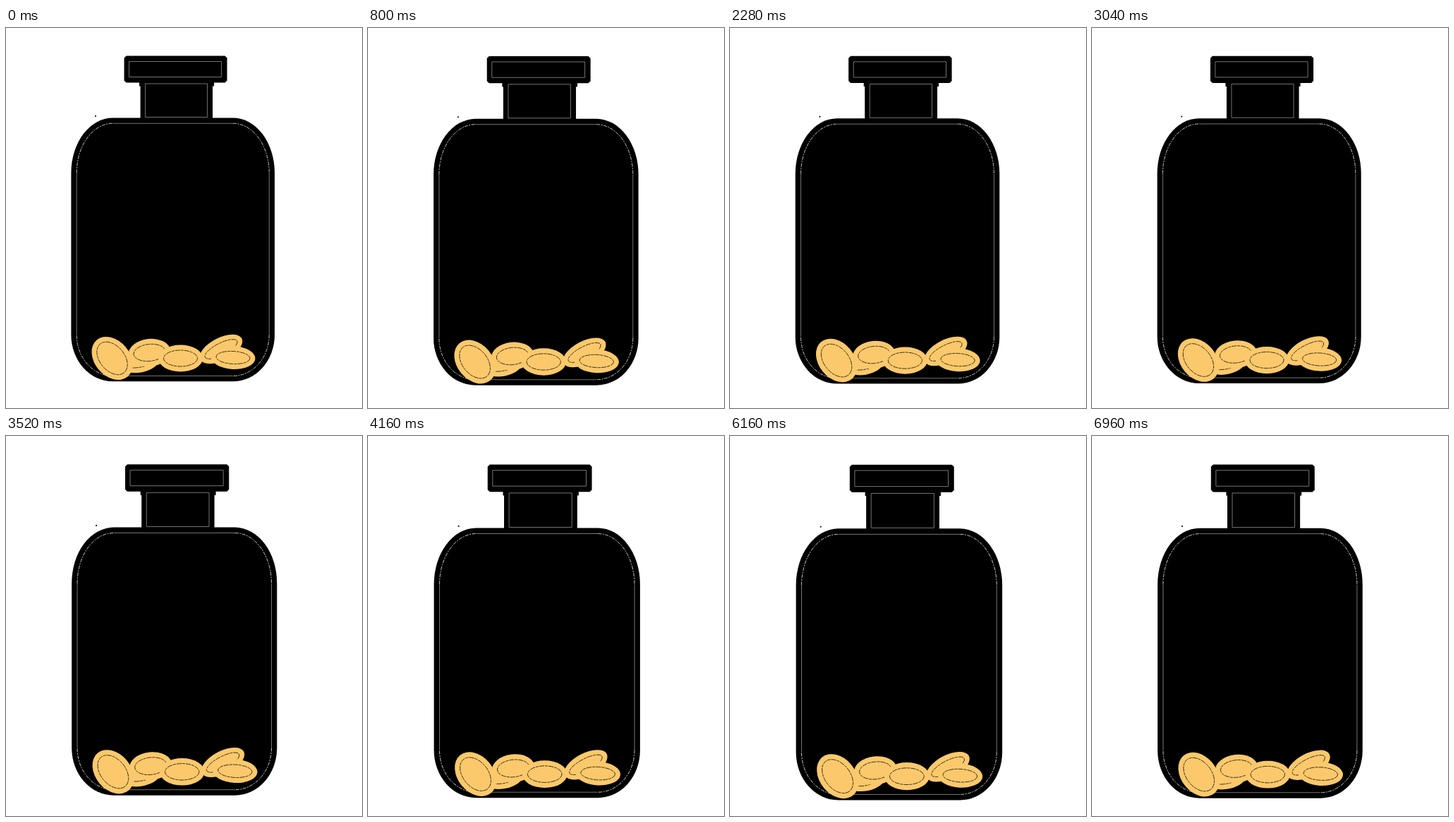
An HTML page with a canvas that plays this animation: 505x539 px, repeating every 7000 ms.

```html
<!DOCTYPE html>
<html lang="en">
<head>
<meta charset="utf-8">
<title>Jar of coins</title>
<style>
  html, body { margin: 0; width: 100%; height: 100%; overflow: hidden; background: #fff; }
  canvas { display: block; }
</style>
</head>
<body>
<canvas id="stage" width="505" height="539"></canvas>
<script>
const ctx = document.getElementById('stage').getContext('2d');
const LOOP = 7000, STEP = 40;
const GOLD = '#fbc96c', LINE = '#808080', INK = '#2a2110';
const QUARTER = Math.PI / 2;

const jar = { left: 91.8, top: 127, right: 380.5, bottom: 500.8, rx: 59, high: 78, low: 66 };
const rim = 7.8;
const coinInset = 7.5;

// Back to front
const coins = [
  { x: 190, y: 474, rx: 27, ry: 14, deg: -12 },
  { x: 203, y: 460, rx: 30, ry: 19.5, deg: -6 },
  { x: 247, y: 468, rx: 31.5, ry: 19, deg: 0 },
  { x: 150, y: 468, rx: 34, ry: 25, deg: 50 },
  { x: 304.5, y: 455, rx: 33, ry: 16, deg: -27 },
  { x: 321.5, y: 467, rx: 31.5, ry: 16.5, deg: 3 }
];

// A slowly quickening swell, with a growing downward stretch
function stretchAt(s) {
  const turns = 0.691 * s + 0.0147 * s * s;
  const swell = (1 - Math.cos(Math.PI * turns)) / 2;
  return {
    x: 1 + (4 + 0.25 * s) * swell / jar.right,
    y: 1 + ((8.7 + 0.2 * s) * swell + 0.16 * s * s) / jar.bottom
  };
}

function stroke(color, dash = []) {
  ctx.strokeStyle = color;
  ctx.lineWidth = 0.9;
  ctx.setLineDash(dash);
  ctx.stroke();
}

function outline(x, y, w, h) {
  ctx.beginPath();
  ctx.rect(x, y, w, h);
  stroke(LINE);
}

function chamfered(x, y, w, h, c) {
  ctx.beginPath();
  ctx.moveTo(x + c, y);
  ctx.lineTo(x + w - c, y);
  ctx.lineTo(x + w, y + c);
  ctx.lineTo(x + w, y + h - c);
  ctx.lineTo(x + w - c, y + h);
  ctx.lineTo(x + c, y + h);
  ctx.lineTo(x, y + h - c);
  ctx.lineTo(x, y + c);
  ctx.fill();
}

// The jar's corners in clockwise order, moved inwards by the inset
function jarCorners(inset) {
  const { left, top, right, bottom, rx, high, low } = jar;
  const l = left + rx, r = right - rx, t = top + high, b = bottom - low;
  return [[l, t, high], [r, t, high], [r, b, low], [l, b, low]].map(([x, y, ry], i) => ({
    x, y, rx: rx - inset, ry: ry - inset, from: (i + 2) * QUARTER
  }));
}

function pointOn(c, angle) {
  return [c.x + c.rx * Math.cos(angle), c.y + c.ry * Math.sin(angle)];
}

function addCorner(c) {
  ctx.ellipse(c.x, c.y, c.rx, c.ry, 0, c.from, c.from + QUARTER);
}

function drawBody() {
  ctx.beginPath();
  jarCorners(0).forEach(addCorner);
  ctx.fill();
  const inner = jarCorners(rim);
  inner.forEach((c, i) => {
    const next = inner[(i + 1) % 4];
    ctx.beginPath();
    addCorner(c);
    stroke('#d8d8d8', [5, 1.5, 2, 1.5]);
    ctx.beginPath();
    ctx.moveTo(...pointOn(c, c.from + QUARTER));
    ctx.lineTo(...pointOn(next, next.from));
    stroke(LINE);
  });
}

function drawJar() {
  ctx.fillStyle = '#000';
  chamfered(167, 39, 146, 38, 3);
  ctx.fillRect(188.5, 76, 106, 6);
  ctx.fillRect(190, 76, 102.5, 54);
  ctx.fillRect(125.5, 123.5, 1.8, 1.8);
  drawBody();
  outline(174, 47, 131, 22);
  outline(197, 78.5, 88, 47.5);
}

function ellipse({ x, y, rx, ry, deg }, inset) {
  ctx.beginPath();
  ctx.ellipse(x, y, rx - inset, ry - inset, deg * Math.PI / 180, 0, 2 * Math.PI);
}

function drawCoin(coin) {
  ctx.fillStyle = GOLD;
  ellipse(coin, 0);
  ctx.fill();
  ellipse(coin, coinInset);
  stroke(INK, [7, 1, 4, 1]);
}

function draw(t) {
  const k = stretchAt(t / 1000);
  ctx.setTransform(1, 0, 0, 1, 0, 0);
  ctx.fillStyle = '#fff';
  ctx.fillRect(0, 0, 505, 539);
  ctx.setTransform(k.x, 0, 0, k.y, 0.6, 0.5);
  drawJar();
  coins.forEach(drawCoin);
}

function tick() {
  const t = performance.now() % LOOP;
  draw(Math.floor(t / STEP) * STEP);
  requestAnimationFrame(tick);
}
tick();
</script>
</body>
</html>
```
